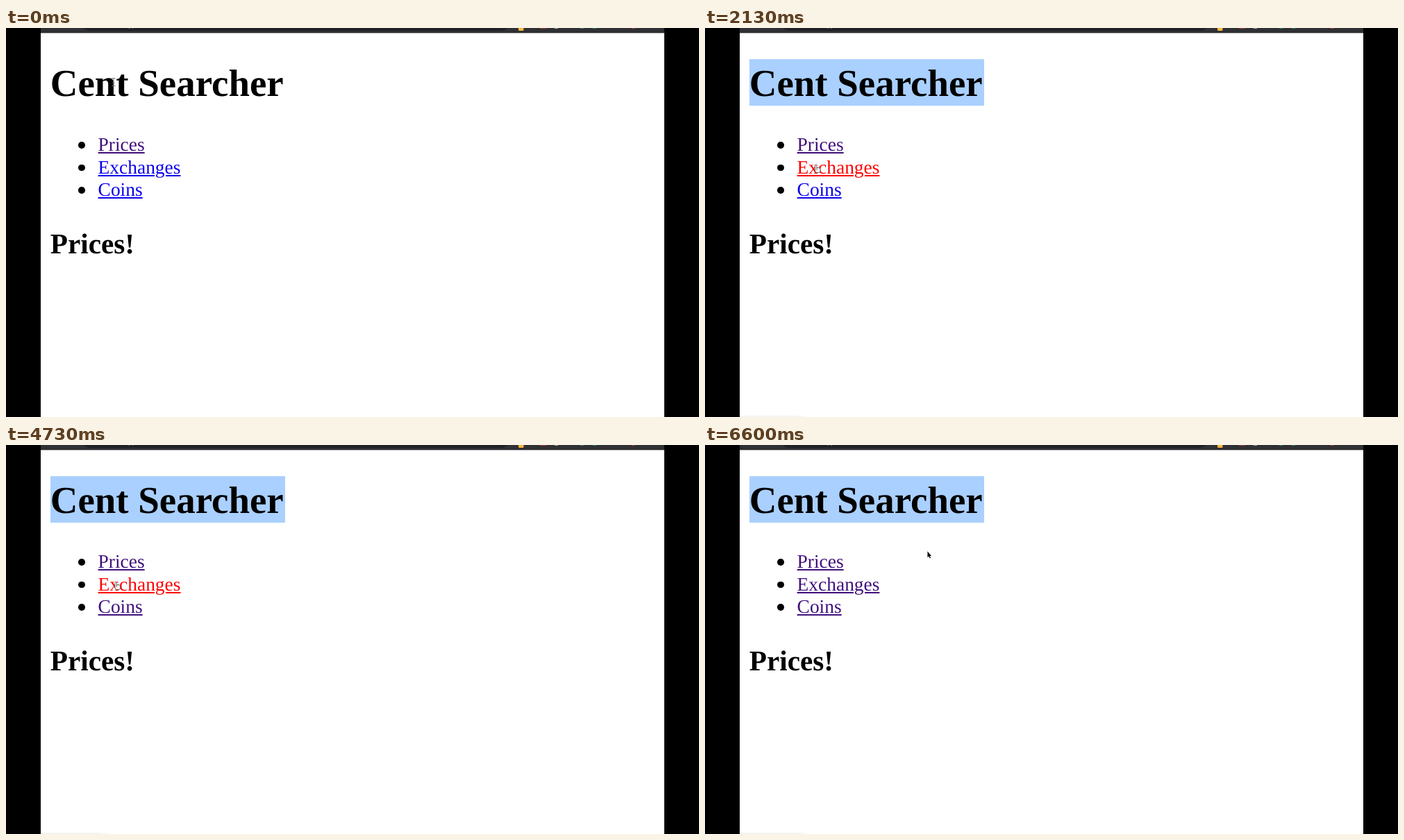
An HTML page for the animation above (6.67 s loop, 998 by 561 pixels).

```html
<!DOCTYPE html>
<html lang="en">
<head>
<meta charset="utf-8">
<style>
  html, body { margin: 0; width: 100%; height: 100%; overflow: hidden; background: #000; }
  #page { position: absolute; left: 50px; top: 0; width: 898px; height: 561px; background: #fff; overflow: hidden; }
  #page > * { position: absolute; margin: 0; white-space: pre; }
  h1, h2, a { font-family: "Liberation Serif", "Times New Roman", serif; color: #000; text-rendering: geometricPrecision; }
  h1 { left: 13.8px; top: 49px; font-size: 54.9px; line-height: 61px; }
  h2 { left: 13.8px; top: 288px; font-size: 41.2px; line-height: 46px; }
  a { left: 82.6px; font-size: 27.45px; line-height: 30px;
      text-decoration: underline 2px; text-underline-offset: 2px; }
  #mark { left: 14px; top: 45px; height: 67px; background: #aad0ff; }
  .dot { left: 54px; width: 9.6px; height: 9.6px; border-radius: 50%; background: #000; }
  #status { left: 0; top: 559px; width: 100px; height: 2px; background: linear-gradient(90deg, #f3f3f3 80%, #fff); }
  svg { left: 0; top: 0; }
</style>
</head>
<body>
<div id="page">
  <div id="mark"></div>
  <h1>Cent Searcher</h1>
  <h2></h2>
  <div id="status"></div>
  <svg width="898" height="561" viewBox="50 0 898 561">
    <rect x="50" width="898" height="7.3" fill="#2f3033"/>
    <rect x="110" y="-20" width="614" height="24" rx="10" fill="#202124"/>
    <path d="M177 1l1-2M182 1l1-2" stroke="#999"/>
    <path id="tail" d="M223 0h4" stroke="#888"/>
    <rect x="738" y="-4" width="7.5" height="8" rx="1.5" fill="#f5b83d"/>
    <path d="M769 .5h9M901 .5h5" stroke="#b33a35"/>
    <path d="M790 .5h5" stroke="#aaa"/>
    <path d="M827 .5h5M845 .5h5" stroke="#248a5c"/>
    <g id="cursor">
      <path id="beam" d="M-2.5-5.5h5M0-5.5v11M-2.5 5.5h5M-1.5 1h3" stroke="#777"/>
      <g id="hand" fill="#fff" stroke="#555" stroke-width=".9">
        <rect x="-3" y="-1.5" width="7.5" height="7" rx="2.5"/>
        <path d="M-3 2V-4.5a1.2 1.2 0 0 1 2.4 0V2"/>
      </g>
      <path id="arrow" d="M-1.5-5V4L.4 2.4 1.8 5.2 3.1 4.5 1.9 1.9H4.2Z"
        fill="#111" stroke="#fff" stroke-width=".8" paint-order="stroke"/>
    </g>
  </svg>
</div>
<script>
const LOOP = 6670, STEP = 1000 / 15, CLICKS = 9;
const LEAD = 6, TRAVEL = 5, HOLD = 2; // steps: start of move before press, move, button down
const WORD_STEP = 5, LINE_STEP = 7; // heading selected by word, then whole
const $ = s => document.querySelector(s);
const show = (id, on) => { $(id).style.display = on ? "" : "none"; };

function addRow(name, i) {
  const link = document.createElement("a"), dot = document.createElement("div");
  link.textContent = name;
  dot.className = "dot";
  link.style.top = Math.round(153 + 32.6 * i) + "px";
  dot.style.top = 164.2 + 32.6 * i + "px";
  $("svg").before(link, dot);
  return link;
}
const links = ["Prices", "Exchanges", "Coins"].map(addRow);

// Clicks sweep down and back up the list, unhurried at first
const linkAt = k => 2 - Math.abs(2 - k % 4);
const pressAt = k => Math.round(47 + (k - 2) * (k < 2 ? 14.7 : 7.85));

function stop(k) {
  if (k < 0) return [155, 78];
  if (k === CLICKS) return [333, 157];
  return [160 + 15 * 0.1 ** k, 176 + 27 * linkAt(k)];
}

function pointer(step) {
  let k = 0;
  while (k < CLICKS && pressAt(k + 1) - LEAD <= step) k++;
  const t = Math.min(1, Math.max(0, (step - pressAt(k) + LEAD) / TRAVEL));
  const ease = 1 - (1 - t) ** 3;
  const from = stop(k - 1), to = stop(k);
  return from.map((v, i) => v + (to[i] - v) * ease);
}

function draw(ms) {
  const step = Math.floor((ms % LOOP + 4) / STEP);
  const [x, y] = pointer(step);
  const onHeading = y < 112, onLink = y > 150 && x < 200;
  $("#cursor").setAttribute("transform", `translate(${x} ${y})`);
  show("#beam", onHeading);
  show("#hand", onLink);
  show("#arrow", !onHeading && !onLink);
  show("#status", !onHeading);

  let current = 0, pressed = -1;
  const visited = new Set([0]);
  for (let k = 0; k < CLICKS && pressAt(k) <= step; k++) {
    const link = linkAt(k);
    if (step < pressAt(k) + HOLD) pressed = link;
    else visited.add(current = link);
  }
  $("h2").textContent = links[current].textContent + "!";
  show("#tail", current === 1);
  links.forEach((link, i) => {
    link.style.color = i === pressed ? "#f00" : visited.has(i) ? "#40107c" : "#0800ee";
  });
  $("#mark").style.width = (step < WORD_STEP ? 0 : step < LINE_STEP ? 113 : 337.5) + "px";
}

const start = performance.now();
function tick() {
  draw(performance.now() - start);
  requestAnimationFrame(tick);
}
tick();
</script>
</body>
</html>
```
